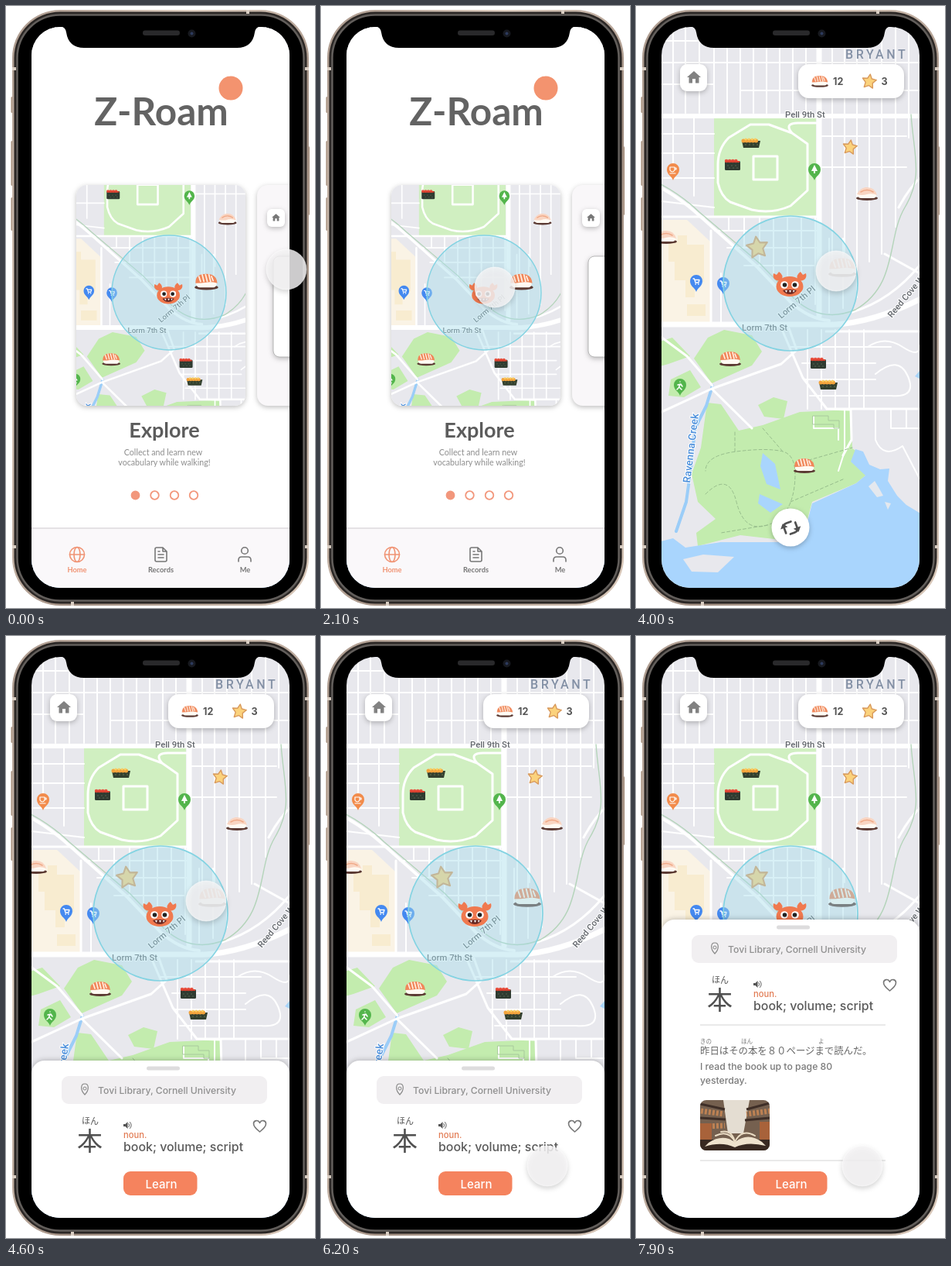
Animation of 400x777 px, one loop 8000 ms. Source, as an HTML page:

```html
<!DOCTYPE html>
<html lang="en">
<head>
<meta charset="utf-8">
<title>Walking vocabulary app</title>
<style>
html, body { margin: 0; width: 100%; height: 100%; overflow: hidden; background: #fff; }
svg { display: block; }
#stage { width: 400px; height: 777px; }
text { font-family: "Noto Sans CJK JP", "Noto Sans CJK", "Noto Sans", sans-serif; }
.lato { font-family: Lato, sans-serif; }
.ui { font-family: Inter, sans-serif; font-weight: 500; }
.street { font: 500 11.3px Roboto, sans-serif; fill: #62666c; stroke: #fff; stroke-width: 2px; paint-order: stroke; }
.mid { text-anchor: middle; }
.line { fill: none; stroke-linecap: round; stroke-linejoin: round; }
.soft { filter: drop-shadow(0 2px 3px rgba(0,0,0,.25)); }

.anim { animation: 8s linear infinite both; }
#touch { animation-name: touch; }
#home { animation-name: leave; }
#rise { animation-name: rise; }
#panel { animation-name: expand; }
#brief { animation-name: fade; }
#full { animation-name: show; }
.blink { animation-name: blink; }
#bars { animation-name: flash; }

@keyframes touch {
  0%, 3% { transform: translate(363px, 340px); animation-timing-function: ease-in-out; }
  18.75%, 40% { transform: translate(225px, 363px); animation-timing-function: ease-in-out; }
  49%, 59% { transform: translate(259px, 342px); animation-timing-function: ease-in-out; }
  73%, 100% { transform: translate(293px, 684px); }
}
@keyframes leave {
  0%, 28.5% { opacity: 1; visibility: visible; }
  33% { opacity: 0; visibility: visible; }
  33.1%, 100% { opacity: 0; visibility: hidden; }
}
@keyframes rise {
  0%, 51.5% { transform: translateY(215px); animation-timing-function: ease-out; }
  56%, 100% { transform: none; }
}
@keyframes expand {
  0%, 81% { transform: none; animation-timing-function: ease-in-out; }
  88.6%, 100% { transform: translateY(-182px); }
}
@keyframes fade { 0%, 81% { opacity: 1; } 88.6%, 100% { opacity: 0; } }
@keyframes show { 0%, 81% { opacity: 0; } 88.6%, 100% { opacity: 1; } }
@keyframes blink { 0%, 83% { opacity: 1; } 83.01%, 87% { opacity: 0; } 87.01%, 100% { opacity: 1; } }
@keyframes flash { 0%, 84% { opacity: 0; } 84.01%, 86% { opacity: 1; } 86.01%, 100% { opacity: 0; } }
</style>
</head>
<body>
<svg id="stage" viewBox="0 0 400 777">
<defs>
  <linearGradient id="metal" x1="0" x2="1" y1="0" y2="1">
    <stop offset="0" stop-color="#a8968a"/><stop offset=".3" stop-color="#e0d0c2"/>
    <stop offset=".6" stop-color="#a39083"/><stop offset="1" stop-color="#dccbbc"/>
  </linearGradient>
  <clipPath id="screen"><rect x="33" y="27" width="334" height="724" rx="37"/></clipPath>
  <clipPath id="card"><rect x="91" y="231" width="219" height="285" rx="14"/></clipPath>
  <clipPath id="photoBox"><rect x="83" y="599" width="90" height="65" rx="8"/></clipPath>

  <!-- food and markers, drawn around their centres -->
  <g id="plate">
    <ellipse cy="7" rx="14" ry="3" fill="#5b3a33"/>
    <path d="M-12 0Q-13 7-8 7H9Q13 6 12 0Z" fill="#fffaf3"/>
  </g>
  <g id="sushi">
    <use href="#plate"/>
    <path d="M-13 2Q-13-6-7-8Q0-10 6-8Q12-6 13 2Q6 0 0 1T-13 2Z" fill="#f0875a"/>
    <path class="line" d="M-9-6l2 6m2-8l2 8m2-8l2 8m2-8l2 8m1-6l2 5" stroke="#fff1e4" stroke-width="1.600"/>
  </g>
  <g id="pale">
    <use href="#plate"/>
    <path d="M-13 2Q-10-5-2-7Q10-8 13 3Q6 0 0 2T-13 2Z" fill="#f9d5c2"/>
    <path class="line" d="M-8-1Q0-6 8-1" stroke="#f0a987" stroke-width="1.500"/>
  </g>
  <g id="roe">
    <rect x="-10" y="-5" width="20" height="12" rx="1.500" fill="#2f3b31"/>
    <path class="line" d="M-8-5H8" stroke="#e8503f" stroke-width="4.500" stroke-dasharray=".1 4"/>
    <path d="M-9-4H9" stroke="#d9402f" stroke-width="2"/>
    <path d="M-7 1H8M-5 4H7" stroke="#53634f" stroke-dasharray="2 3"/>
  </g>
  <g id="corn">
    <path d="M-12-3H12L10 6H-10Z" fill="#33402f"/>
    <path class="line" d="M-10-3H10" stroke="#f3a33c" stroke-width="5" stroke-dasharray=".1 4"/>
    <path class="line" d="M-7-5H8" stroke="#f8ce62" stroke-width="3" stroke-dasharray=".1 4"/>
    <path d="M-8 2H9" stroke="#64744e" stroke-dasharray="2 3"/>
  </g>
  <path id="star" d="M0-9L2.800-3.400 9-2.700 4.600 2 5.600 8.400 0 5.600-5.600 8.400-4.600 2-9-2.700-2.800-3.400Z" fill="#fbd27c" stroke="#d99a5c" stroke-width="1.400" stroke-linejoin="round"/>
  <path id="drop" d="M0 11C-2 5-8 4-8-3A8 8 0 0 1 8-3C8 4 2 5 0 11Z"/>
  <g id="cart">
    <use href="#drop" fill="#4489f0"/>
    <path class="line" d="M-4-6h1.500l1.500 5h4l1-3.500h-6" stroke="#fff" stroke-width="1.300"/>
    <path d="M-1.500 1h1.500m2 0h1.500" stroke="#fff" stroke-width="1.500"/>
  </g>
  <path id="house" d="M0-8L-9 0h2.500v7.500h4.500V2h4v5.500h4.500V0H9Z"/>
  <path id="heart" class="line" d="M0 7C-5 3-8 0-8-3.500C-8-8-2-9 0-4.500C2-9 8-8 8-3.500C8 0 5 3 0 7Z" stroke="#777" stroke-width="1.600"/>

  <g id="crab">
    <g fill="#f0794f">
      <ellipse cy="3" rx="17.500" ry="13"/>
      <path d="M-11-4C-18-4-23-7-21-14L-17-12-14-16Q-8-12-10-6Z"/>
      <path d="M11-4C18-4 23-7 21-14L17-12 14-16Q8-12 10-6Z"/>
    </g>
    <g fill="#fff"><circle cx="-7" cy="1" r="4.800"/><circle cx="7" cy="1" r="4.800"/></g>
    <g fill="#222"><circle cx="-6.500" cy="1" r="2.800"/><circle cx="6.500" cy="1" r="2.800"/></g>
    <path d="M-9 8Q0 6 9 8Q6 13 0 13T-9 8Z" fill="#6b2b25"/>
    <path d="M-6 8l1.500 3 1.500-3m2 0l1.500 3 1.500-3m2 0l1 3 1.500-3" fill="#fff"/>
  </g>

  <g id="ground">
    <rect x="20" y="20" width="360" height="740" fill="#e8e8ed"/>
    <path d="M20 276H66L96 304V410H20Z" fill="#faf3e5"/>
    <path d="M42 304h12v-8h12v12h22v48H76v20H64v-22H50V330h-8ZM66 385h24v15H66Z" fill="#f8ecd0"/>
    <path d="M101 143H233V272H101Z" fill="#d0efc1"/>
    <g fill="#c3ecae">
      <path d="M75 455L93 428 114 418 150 425 163 446 150 464 98 487Z"/>
      <path d="M20 436L47 428 70 452 42 462 20 468ZM45 482L70 470 84 492 62 505 42 503Z"/>
      <path d="M158 515L178 505 196 510 191 533 166 530Z"/>
      <path d="M92 512L110 514 133 548 164 541 212 524 278 521 280 571 296 582 297 606 285 616 228 640 214 692 135 683 80 697 78 680 103 662 80 640 72 604 84 570Z"/>
    </g>
    <g fill="#a9d5fd">
      <path d="M20 694L48 687 64 699 110 692 215 692 228 642 285 616 297 606 278 588 284 572 294 575 302 592 316 598 328 597 326 613 338 632 350 644 380 662V770H20Z"/>
      <path d="M164 577L180 591 187 624 169 617 161 594ZM160 630L190 643 174 654 158 642ZM361 478l6-7v10Z"/>
    </g>
    <path d="M61 714L87 708 127 711 106 731 72 730Z" fill="#e8e8ed"/>
    <path class="line" d="M99 490L91 516 76 546 72 590 65 640 52 678" stroke="#9bcdf8" stroke-width="4"/>

    <g class="line" stroke="#fff" stroke-width="2">
      <path d="M48 27V138M64 27V138M82 27V138M101 27V138M118 27V138M135 27V138M152 27V138M169 27V138M186 27V138M203 27V138M220 27V138M254 27V330M270 27V318M286 27V325M302 27V330M318 27V320M336 27V285M353 27V170"/>
      <path d="M33 45H101M33 73H367M33 101H101M135 109H367M33 165H101M33 190H101M33 222H101M48 142V222M75 142V245M240 168H350M240 208H350M33 252L101 260"/>
      <path d="M102 290H235M118 312H235M140 335H235M120 272V290M140 272V312M160 272V335M178 272V348M196 272V366M214 272V380M232 272V385M250 300V396M268 300V390M286 320V376M110 345V411"/>
      <path d="M222 418V520M240 418V520M258 418V520M276 418V520M295 418V520M200 440H330M215 461H310M218 482H310M225 503H330M270 521V575L262 600M230 530V545H262V560"/>
      <path d="M300 440Q322 425 345 440T367 438M310 475Q340 450 352 478T330 503M310 521V560Q320 585 345 568M330 521V545H367M350 521V545M345 568L367 610"/>
    </g>
    <g class="line" stroke="#fff" stroke-width="3">
      <path d="M120 170Q106 184 106 205V228Q110 246 122 253L150 263Q175 269 200 258L222 238V178L202 164 172 153H148ZM152 194H183V224H152ZM202 164Q191 151 210 151H233"/>
      <path d="M20 530L98 494 188 462 208 444 198 416M190 420L216 480 247 520H380M20 418L66 452 99 490M98 494L150 545M247 520L278 521 279 560 268 580"/>
      <path d="M340 260Q362 220 380 215M322 320L367 345M280 395Q330 380 367 335M33 272H233M97 290V411M246 420H367"/>
    </g>
    <g class="line" stroke="#fff">
      <path d="M20 142H380" stroke-width="6"/>
      <path d="M237 20V400" stroke-width="7"/>
      <path d="M20 411H236Q300 415 380 372" stroke-width="7"/>
      <path d="M20 228Q52 244 77 266L157 337 200 382Q224 404 250 406" stroke-width="4"/>
    </g>
    <path class="line" d="M20 224Q55 240 82 266L160 332 205 378Q240 410 284 392C340 360 324 300 348 260S360 195 356 140" stroke="#b4d4ba" stroke-width="1.400"/>
    <path class="line" d="M90 630Q120 600 130 640T170 670 205 620 190 575 130 575 90 600M128 550V575M170 670L110 680M210 590L280 570M200 640L270 610M164 545L190 575" stroke="#97bd8c" stroke-dasharray="4 3"/>
    <path class="line" d="M229 529h20v6h14v10h-7v-5h-27Z" stroke="#a8c99d"/>
    <path d="M301 620l8-7 6 10 5 9-8 2ZM322 640l8 2-4 8Z" fill="#e4e8ee"/>

    <text class="street" x="193" y="144">Pell 9th St</text>
    <text class="street" x="137" y="419">Lorm 7th St</text>
    <text class="street" transform="translate(188 404) rotate(-40)">Lorm 7th Pl</text>
    <text class="street" transform="translate(331 403) rotate(-50)">Reed Cove Way</text>
    <text class="street" transform="translate(70 616) rotate(-83)" style="font-size:13.500px;fill:#4a8edb">Ravenna Creek</text>
    <text x="271" y="67.500" style="font:500 16px Roboto,sans-serif;letter-spacing:3.600px" fill="#8390a5">BRYANT</text>

    <use href="#cart" x="78" y="358"/><use href="#cart" x="113" y="361"/>
    <g transform="translate(48 214)">
      <use href="#drop" fill="#f28b4b"/>
      <path class="line" d="M-4-6h6v4q-3 4-6 0Zm6 1h2v2H2M-4 2h7" stroke="#fff" stroke-width="1.200"/>
    </g>
    <g transform="translate(231 214)">
      <use href="#drop" fill="#53b54c"/><path d="M0-9l4 8H1v3h-2v-3h-3Z" fill="#fff"/>
    </g>
    <g transform="translate(57 492)">
      <use href="#drop" fill="#53b54c"/>
      <path class="line" d="M0-7v.1M-3-3L1-4 3-1M0-3L-2 1-4 3M-1 0L2 3" stroke="#fff" stroke-width="1.500"/>
    </g>
  </g>
  <g id="food">
    <use href="#corn" x="149" y="177"/><use href="#roe" x="125" y="205"/>
    <use href="#pale" x="299" y="241"/><use href="#pale" x="39" y="297"/>
    <use href="#sushi" transform="translate(267 337) scale(1.280)"/>
    <use href="#sushi" x="122" y="455"/><use href="#sushi" x="218" y="593"/>
    <use href="#roe" x="236" y="461"/><use href="#corn" x="249" y="489"/>
  </g>
  <circle id="zone" cx="200" cy="358" r="87" fill="#a5dcea" fill-opacity=".43" stroke="#83d3e2" stroke-width="1.700"/>

  <!-- word entry, placed for the lower panel position -->
  <g id="entry">
    <rect x="72" y="568" width="266" height="36" rx="9" fill="#f1eff1"/>
    <path class="line" d="M102 592C96 586 96.500 578 102 578S108 586 102 592Z" stroke="#888" stroke-width="1.200"/>
    <circle cx="102" cy="584" r="2" fill="none" stroke="#888"/>
    <text class="ui" x="119" y="591" font-size="12.200" fill="#8f8f8f">Tovi Library, Cornell University</text>
    <text class="mid" x="109" y="630" font-size="11" fill="#555">ほん</text>
    <text class="mid" x="108.500" y="664" font-size="33" fill="#505050">本</text>
    <path d="M152 630h2.500l3-3v9l-3-3H152Z" fill="#555"/>
    <path class="line" d="M159 629.500q1.500 2 0 4m1.500-6q3.500 4 0 8" stroke="#555"/>
    <text class="ui" x="152" y="648" font-size="11.200" fill="#e27c54">noun.</text>
    <text class="ui" x="152" y="665" font-size="15.900" fill="#5a5a5a">book; volume; script</text>
    <use href="#heart" x="328.500" y="633"/>
  </g>
</defs>

<!-- handset -->
<g fill="#a8917f">
  <rect x="6.500" y="117" width="4" height="21" rx="1.500"/><rect x="6.500" y="174" width="4" height="58" rx="1.500"/>
  <rect x="6.500" y="247" width="4" height="43" rx="1.500"/><rect x="389" y="181" width="4" height="89" rx="1.500"/>
</g>
<rect x="8" y="5" width="384" height="769" rx="62" fill="url(#metal)"/>
<rect x="10.500" y="7.500" width="379" height="764" rx="59.500" fill="#2b2725"/>
<rect x="14.500" y="11.500" width="371" height="756" rx="55.500" fill="#000" stroke="#625e5b" stroke-width="2.500"/>
<path d="M8 81h5m374 0h5M8 698h5m374 0h5M313 5v5M86 769v5" stroke="#d9cdc2" stroke-width="4"/>

<g clip-path="url(#screen)">
  <use href="#ground"/>
  <use href="#star" transform="translate(157 311) rotate(-8) scale(1.500)"/>
  <use href="#star" transform="translate(277 182) rotate(8)"/>
  <use href="#food" class="anim blink"/>
  <use href="#zone"/>
  <use href="#crab" x="199" y="359"/>

  <g class="soft" fill="#fff">
    <rect x="57" y="75" width="35" height="35" rx="9"/>
    <rect x="210" y="75" width="137" height="44" rx="14"/>
    <circle cx="200" cy="673" r="24.500"/>
  </g>
  <use href="#house" x="75" y="92" fill="#828282"/>
  <g class="anim blink"><use href="#sushi" transform="translate(238 97) scale(.78)"/></g>
  <use href="#star" transform="translate(302 97) rotate(8)"/>
  <g font-size="12.600" fill="#555">
    <text class="ui" x="255" y="101.500" style="font-weight:700">12</text>
    <text class="ui" x="317.500" y="101.500" style="font-weight:700">3</text>
  </g>
  <g transform="rotate(-20 200 673)">
    <path class="line" d="M192 678V671Q192 666 197 666H203M208 669V676Q208 681 203 681H197" stroke="#505050" stroke-width="2.700"/>
    <path d="M187 671h10l-5-6ZM203 676h10l-5 6Z" fill="#505050"/>
  </g>

  <g id="rise" class="anim">
    <g id="panel" class="anim">
      <rect x="33" y="548" width="334" height="420" rx="17" fill="#fff" style="filter:drop-shadow(0 -1px 3px rgba(0,0,0,.22))"/>
      <rect class="anim blink" x="182" y="555.500" width="43" height="5" rx="2.500" fill="#dddcdd"/>
    </g>
    <g id="bars" class="anim" fill="#ee966f">
      <rect x="114" y="588" width="174" height="13" rx="4"/><rect x="150" y="629" width="87" height="18" rx="5"/>
    </g>
    <g id="brief" class="anim"><use href="#entry"/></g>
    <g id="full" class="anim">
      <use href="#entry" y="-182"/>
      <path d="M83 502H323M83 677H323" stroke="#d4d4d4"/>
      <g font-size="7.500" fill="#777"><text x="83" y="526">きの</text><text x="136" y="526">ほん</text><text x="236" y="526">よ</text></g>
      <text x="83" y="540" font-size="12.400" fill="#666">昨日はその本を８０ページまで読んだ。</text>
      <g font-size="12.200" fill="#7a7a7a">
        <text class="ui" x="83" y="559.500">I read the book up to page 80</text>
        <text class="ui" x="83" y="577.500">yesterday.</text>
      </g>
      <g clip-path="url(#photoBox)">
        <path d="M83 599h90v65H83Z" fill="#75604f"/>
        <path d="M113 599h34l-8 43h-20Z" fill="#e4ddd2"/>
        <path d="M83 604l32 7M83 622l33 2M173 603l-30 8M173 622l-32 3" stroke="#3e2e27" stroke-width="3"/>
        <path d="M84 613l30 4M174 613l-31 4M84 633l31-1" stroke="#bd8153" stroke-width="7" stroke-dasharray="3 2"/>
        <path d="M83 629h15v27H83ZM160 627h13v30h-13Z" fill="#a8623a"/>
        <path d="M83 650h90v14H83Z" fill="#382921"/>
        <path d="M94 654Q112 642 128 653Q145 640 163 653L168 658Q144 652 128 660Q111 652 89 659Z" fill="#eee2cd"/>
        <path class="line" d="M103 645Q120 637 128 653Q137 635 154 645M110 640Q124 637 128 653" stroke="#eadcc4" stroke-width="2"/>
      </g>
    </g>
    <g class="anim blink">
      <rect x="152" y="691" width="95.500" height="31" rx="9" fill="#f5835e"/>
      <text class="ui mid" x="201" y="713" font-size="15" fill="#fff">Learn</text>
    </g>
  </g>

  <g id="home" class="anim">
    <rect x="33" y="27" width="334" height="724" fill="#fff"/>
    <text class="lato mid" x="201" y="154" font-size="49.500" font-weight="700" fill="#636363">Z-Roam</text>
    <circle cx="291" cy="106" r="15.500" fill="#f3936f"/>

    <g class="soft">
      <rect x="91" y="231" width="219" height="285" rx="14" fill="#fff"/>
      <rect x="325" y="231" width="219" height="285" rx="14" fill="#f9f7f9"/>
    </g>
    <g clip-path="url(#card)">
      <g transform="translate(41 65.700) scale(.85)">
        <use href="#ground"/><use href="#zone"/>
        <use href="#crab" x="199" y="359"/><use href="#food" x="-10" y="4"/>
      </g>
    </g>
    <g class="soft" fill="#fff">
      <rect x="338" y="262" width="23" height="23" rx="6"/>
      <rect x="346" y="323" width="150" height="130" rx="8" stroke="#aaa" stroke-width=".8"/>
    </g>
    <use href="#house" transform="translate(349.500 273) scale(.6)" fill="#777"/>

    <text class="lato mid" x="205" y="557" font-size="27" font-weight="700" fill="#5c5c5c">Explore</text>
    <g class="mid" font-size="10.700" fill="#8d8d8d">
      <text class="lato" x="203.500" y="580">Collect and learn new</text>
      <text class="lato" x="205" y="592.500">vocabulary while walking!</text>
    </g>
    <g fill="none" stroke="#f2977c" stroke-width="1.800">
      <circle cx="167.500" cy="631.500" r="5" fill="#f2977c"/><circle cx="192.500" cy="631.500" r="5.300"/>
      <circle cx="218" cy="631.500" r="5.300"/><circle cx="243" cy="631.500" r="5.300"/>
    </g>
    <path d="M33 674H367V751H33Z" fill="#faf8fa"/>
    <path d="M33 674H367" stroke="#dddadd" stroke-width="1.500"/>
    <g class="line" stroke="#777" stroke-width="1.600">
      <g stroke="#f09373">
        <circle cx="92" cy="708" r="9.500"/><ellipse cx="92" cy="708" rx="4" ry="9.500"/><path d="M82.500 708h19"/>
      </g>
      <path d="M203 699h-8q-2 0-2 2v14q0 2 2 2h11q2 0 2-2v-11Zm0 0v5h5M197 708h7m-7 4h7m-7-8h2"/>
      <circle cx="309" cy="703" r="4.300"/><path d="M301 717v-2q0-4 4-4h8q4 0 4 4v2"/>
    </g>
    <g class="mid" font-size="9.300" font-weight="700" fill="#777">
      <text class="lato" x="92" y="731" fill="#f09373">Home</text>
      <text class="lato" x="200.500" y="731">Records</text>
      <text class="lato" x="309.500" y="731">Me</text>
    </g>
  </g>
</g>

<path d="M70 26Q77 27 78 34Q81 54 101 54H299Q319 54 322 34Q323 27 330 26Z" fill="#000"/>
<rect x="177" y="31.500" width="48" height="6.500" rx="3.200" fill="#29292b"/>
<circle cx="240.500" cy="35.500" r="5" fill="#17191f"/><circle cx="240.500" cy="35.500" r="2" fill="#2c3a5c"/>

<g id="touch" class="anim">
  <circle r="26" fill="#f6f5f6" fill-opacity=".83" stroke="#fff" stroke-opacity=".5" style="filter:drop-shadow(0 3px 3px rgba(0,0,0,.2))"/>
</g>
</svg>
</body>
</html>
```
